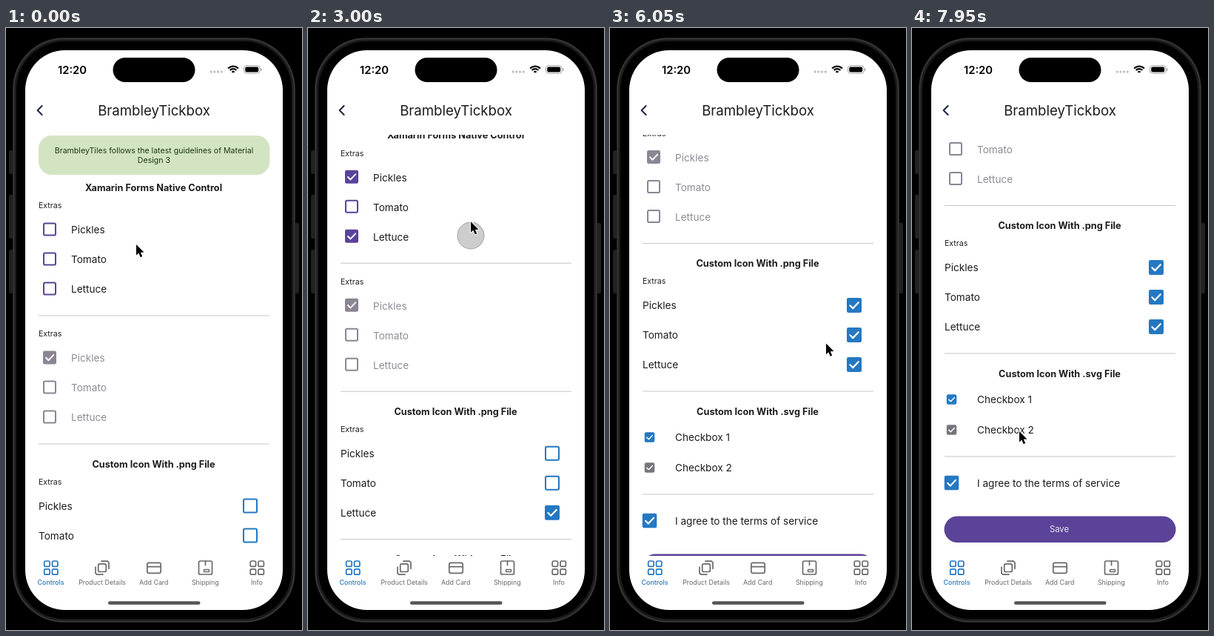
An HTML page with a canvas for the animation above (8 s loop, 400 by 812 pixels).

```html
<!DOCTYPE html>
<html lang="en">
<head>
<meta charset="utf-8">
<title>Checkbox demo</title>
<style>
  html, body { margin: 0; width: 100%; height: 100%; overflow: hidden; background: #000; }
  canvas { display: block; width: 400px; height: 812px; }
</style>
</head>
<body>
<canvas id="stage"></canvas>
<script>
const W = 400, H = 812, LOOP = 8000, STEP = 50;
const canvas = document.getElementById('stage');
const ctx = canvas.getContext('2d');
const dpr = window.devicePixelRatio || 1;
canvas.width = W * dpr;
canvas.height = H * dpr;

const INK = '#1c1c1e', PURPLE = '#5a4398', BLUE = '#2478c2', MUTED = '#8b8594', TAB = '#69696c';
const MAX_SCROLL = 321.5, TOUCH_LAG = 45, SCROLL_LAG = 65, TAP_DELAY = 150;

// The pointer eases from stop to stop; a tap follows arrival, a drag scrolls the list
const home = { x: 176, y: 292 };
const moves = [
  { from: 400, to: 900, x: 112, y: 275, tap: 'nativePickles' },
  { from: 1200, to: 1800, x: 116, y: 355, tap: 'nativeLettuce' },
  { from: 2250, to: 2550, x: 220, y: 358 },
  { from: 2600, to: 3580, x: 220, y: 87.5, drag: 270.5 },
  { from: 3900, to: 4650, x: 328, y: 417.5, tap: 'pngTomato' },
  { from: 5100, to: 5450, x: 330, y: 380, tap: 'pngPickles' },
  { from: 5850, to: 6400, x: 200, y: 536 },
  { from: 6458, to: 6993, x: 200, y: 456, drag: 80 },
  { from: 7200, to: 7900, x: 145, y: 544 }
];

function progress(move, t) {
  const u = Math.min(1, Math.max(0, (t - move.from) / (move.to - move.from)));
  return (1 - Math.cos(Math.PI * u)) / 2;
}

function pointerAt(t) {
  return moves.reduce((p, m) => {
    const k = progress(m, t);
    return { x: p.x + (m.x - p.x) * k, y: p.y + (m.y - p.y) * k };
  }, home);
}

function scrollAt(t) {
  const dragged = moves.reduce((sum, m) => sum + (m.drag || 0) * progress(m, t - SCROLL_LAG), 0);
  return Math.min(MAX_SCROLL, dragged);
}

function isPressed(t) {
  return moves.some(m => m.drag
    ? t >= m.from && t < m.to + 120
    : m.tap && t >= m.to + 50 && t < m.to + TAP_DELAY);
}

function tapAge(name, t) {
  const move = moves.find(m => m.tap === name);
  return move ? t - move.to - TAP_DELAY : -1;
}

function box(x, y, w, h, r, fill, stroke, width = 1) {
  ctx.beginPath();
  ctx.roundRect(x, y, w, h, r);
  if (fill) { ctx.fillStyle = fill; ctx.fill(); }
  if (stroke) { ctx.strokeStyle = stroke; ctx.lineWidth = width; ctx.stroke(); }
}

function line(points, color, width) {
  ctx.beginPath();
  points.forEach(([x, y]) => ctx.lineTo(x, y));
  ctx.strokeStyle = color;
  ctx.lineWidth = width;
  ctx.lineCap = ctx.lineJoin = 'round';
  ctx.stroke();
}

function text(s, x, mid, size, color = INK, weight = 400, align = 'left') {
  ctx.font = `${weight} ${size}px Inter, sans-serif`;
  ctx.textAlign = align;
  ctx.fillStyle = color;
  ctx.fillText(s, x, mid + size * 0.36);
}

function checkbox(x, y, size, color, on, width) {
  const left = x - size / 2, top = y - size / 2, k = size / 18;
  if (on) {
    box(left, top, size, size, 2.2, color);
    line([[x - 5 * k, y + 0.3 * k], [x - 1.6 * k, y + 3.7 * k], [x + 5.2 * k, y - 3.4 * k]], '#fff', 2 * k);
  } else {
    box(left + width / 2, top + width / 2, size - width, size - width, 1.8, null, color, width);
  }
}

function row(label, y, t, opt) {
  const { x = 88, bx = 59, lift = 0, size = 18, color = PURPLE, ink = INK, tap, on, width = 2 } = opt;
  const age = tapAge(tap, t);
  ctx.globalAlpha = age >= 0 && age < 300 ? 1 - 0.25 * Math.sin(Math.PI * age / 300) : 1;
  text(label, x, y + 0.5, 13.6, ink);
  checkbox(bx, y - lift, size, color, on || age >= 0, width);
  ctx.globalAlpha = 1;
}

function rule(y) {
  ctx.fillStyle = '#c5c5c8';
  ctx.fillRect(44, y - 0.5, 312, 1);
}

const heading = (s, y) => text(s, 199.5, y, 12.7, INK, 700, 'center');

function extras(y, t, style, group, checked) {
  text('Extras', 44, y, 10.6);
  ['Pickles', 'Tomato', 'Lettuce'].forEach((label, i) =>
    row(label, y + 32.5 + i * 40, t, { ...style, tap: group + label, on: label === checked }));
  rule(y + 148.5);
}

function content(t) {
  ctx.save();
  ctx.beginPath();
  ctx.rect(26, 144, 348, 568);
  ctx.clip();
  ctx.translate(0, -scrollAt(t));

  box(44, 145, 312.5, 53, 18, '#d3e4c3');
  text('BrambleyTiles follows the latest guidelines of Material', 200, 165.5, 10.6, '#1d3811', 400, 'center');
  text('Design 3', 200, 178, 10.6, '#1d3811', 400, 'center');

  heading('Xamarin Forms Native Control', 215.5);
  extras(239.5, t, { lift: 0.5 }, 'native');
  extras(412.5, t, { lift: 0.5, color: MUTED, ink: '#8f8b97' }, 'disabled', 'Pickles');
  heading('Custom Icon With .png File', 588);
  extras(612, t, { x: 44, bx: 330, size: 20, color: BLUE }, 'png', 'Lettuce');

  const svg = { bx: 53.5, size: 13.5, color: BLUE };
  heading('Custom Icon With .svg File', 787.5);
  row('Checkbox 1', 822.5, t, { ...svg, on: true });
  row('Checkbox 2', 863.5, t, { ...svg, color: '#77757c', width: 1.6 });
  rule(899.5);
  row('I agree to the terms of service', 935, t, { ...svg, size: 19.5 });
  box(43.5, 980, 313, 35.5, 17.75, PURPLE);
  text('Save', 199, 997.5, 11.3, '#eee9f6', 400, 'center');
  ctx.restore();
}

function phone() {
  ctx.fillStyle = '#000';
  ctx.fillRect(0, 0, W, H);
  [[165, 32], [225, 59], [299, 59]].forEach(([y, h]) => box(4, y, 8, h, 2, '#222'));
  box(388, 263, 8, 95, 2, '#222');
  box(9, 13, 382, 789, 69, '#1b1b1b');
  box(10.5, 14.5, 379, 786, 68, null, '#363636', 2);
  box(14, 18, 372, 779, 65, '#000');
  box(26, 30, 348, 755, 54, '#fff');
  box(144.5, 40, 111, 33, 16.5, '#000');
}

function statusBar() {
  text('12:20', 89.5, 56.5, 14.8, '#000', 600, 'center');
  for (let i = 0; i < 4; i++) box(275.5 + i * 4.7, 57.5, 3.2, 3.2, 1.6, '#bcbcbe');
  ctx.strokeStyle = ctx.fillStyle = '#000';
  ctx.lineCap = 'butt';
  ctx.lineWidth = 2.2;
  for (const r of [9.4, 5.9, 2]) {
    ctx.beginPath();
    ctx.arc(307, 61, r, -Math.PI * 0.76, -Math.PI * 0.24);
    ctx.stroke();
  }
  box(321.5, 50.8, 21.5, 10.4, 3.3, null, '#a4a4a6');
  box(323.2, 52.5, 18, 7, 2, '#000');
  box(344, 54.3, 1.4, 3.6, 0.7, '#a4a4a6');
}

function gridIcon(x, color) {
  for (const dx of [-9, 1.8]) for (const dy of [-9, 1.8])
    box(x + dx, 728 + dy, 7.4, 7.4, 1.8, null, color, 1.7);
}

function layersIcon(x, y) {
  box(x - 5.3, y - 5.3, 10.6, 10.6, 2, null, TAB, 1.7);
  for (const s of [1, -1])
    line([[x - s, y - 9 * s], [x + 7.2 * s, y - 9 * s], [x + 9 * s, y - 7.2 * s], [x + 9 * s, y + s]], TAB, 1.7);
}

function tabs() {
  gridIcon(60.7, BLUE);
  layersIcon(130, 728.2);
  box(190.8, 721.3, 18.4, 14, 2.5, null, TAB, 1.7);
  line([[191, 726.7], [209, 726.7]], TAB, 1.7);
  box(260.5, 719, 18, 18, 2, null, TAB, 1.7);
  line([[269.5, 719], [269.5, 724.5]], TAB, 1.7);
  box(267.5, 730.5, 7, 3, 0.5, null, TAB, 1.4);
  gridIcon(339.2, TAB);
  ['Controls', 'Product Details', 'Add Card', 'Shipping', 'Info'].forEach((s, i) =>
    text(s, 60.5 + i * 69.6, 748, 8.9, i ? TAB : BLUE, i ? 400 : 500, 'center'));
  box(138, 773.3, 124.5, 4.4, 2.2, '#545456');
}

function pointer(t) {
  if (isPressed(t)) {
    const touch = pointerAt(t - TOUCH_LAG);
    ctx.beginPath();
    ctx.arc(touch.x, touch.y + 0.5, 18, 0, Math.PI * 2);
    ctx.fillStyle = 'rgba(180,180,180,.66)';
    ctx.fill();
    ctx.strokeStyle = '#9b9b9b';
    ctx.lineWidth = 0.9;
    ctx.stroke();
  }
  const { x, y } = pointerAt(t);
  const arrow = new Path2D('M0 0V14.6L3.3 11.6L5.7 17.2L8.2 16.1L5.8 10.7L10.4 10.4Z');
  ctx.save();
  ctx.translate(x, y);
  ctx.strokeStyle = '#fff';
  ctx.lineWidth = 2;
  ctx.lineJoin = 'round';
  ctx.stroke(arrow);
  ctx.fillStyle = '#000';
  ctx.fill(arrow);
  ctx.restore();
}

function draw(t) {
  ctx.setTransform(dpr, 0, 0, dpr, 0, 0);
  phone();
  statusBar();
  line([[48.6, 105], [42.6, 111], [48.6, 117]], '#1d2444', 2);
  text('BrambleyTickbox', 200, 111.5, 18.6, INK, 400, 'center');
  content(t);
  tabs();
  pointer(t);
}

const start = performance.now();
function frame() {
  const t = (performance.now() - start) % LOOP;
  draw(Math.floor(t / STEP) * STEP);
  requestAnimationFrame(frame);
}
frame();
</script>
</body>
</html>
```
